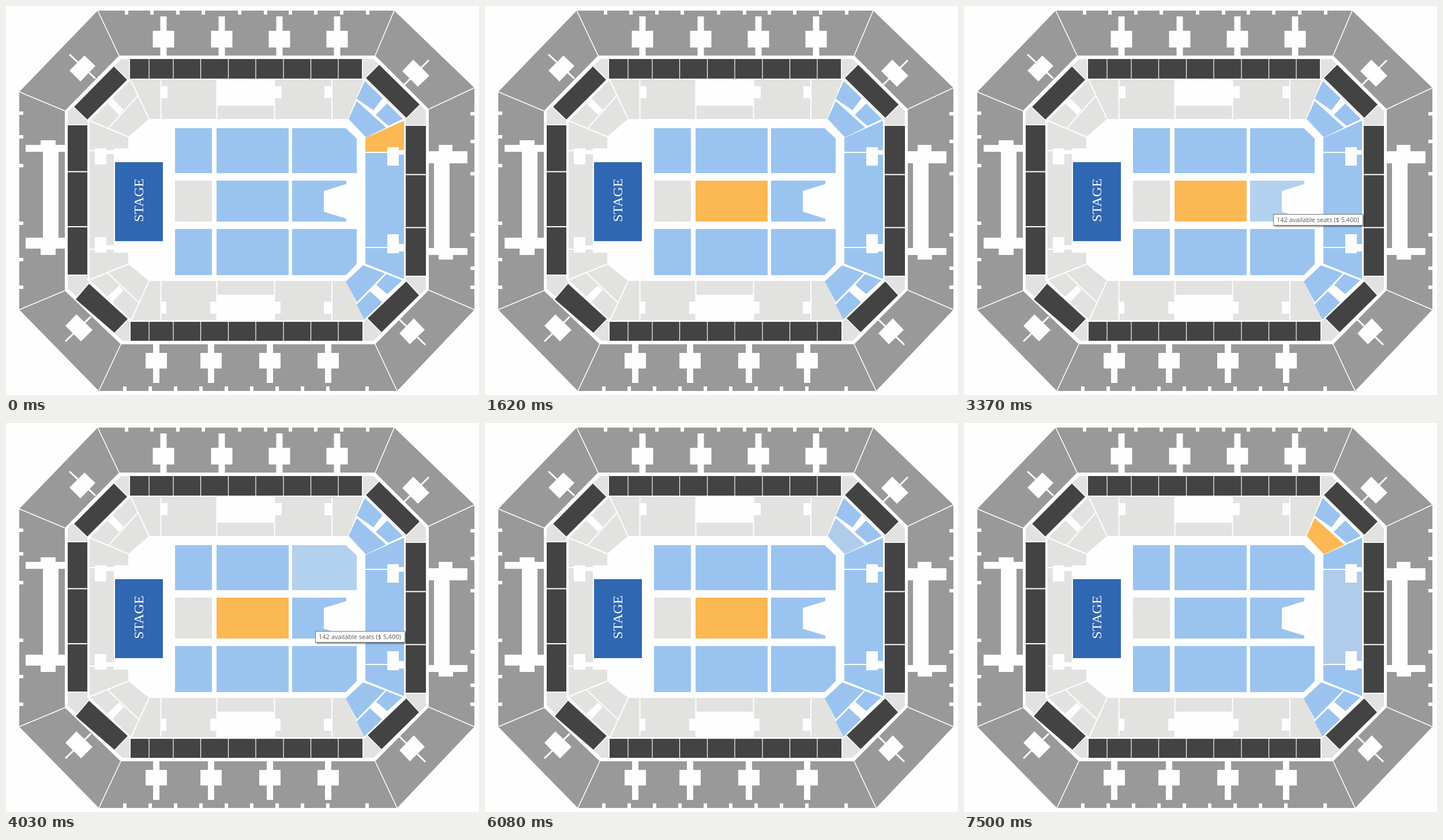
An HTML page that plays this animation: 820x675 px, repeating every 8000 ms.

```html
<!DOCTYPE html>
<html lang="en">
<head>
<meta charset="utf-8">
<title>Seating plan</title>
<style>
  html, body { margin: 0; width: 100%; height: 100%; overflow: hidden; background: #fefefe; }
  svg { display: block; width: 820px; height: 675px; }
  :root { --free: #9ac4ef; --floor: #b2d1ee; --stand: #b0cceb; --pick: #fcb852; }
  .outer { fill: #999; }
  .white { fill: #fefefe; }
  .light { fill: #e2e2e0; }
  .line { fill: none; stroke: #fefefe; stroke-width: 2; }
  .thin { stroke-width: 1.2; }
  .aisle { stroke-width: 3; }
  .dark { fill: #434343; stroke: #fefefe; stroke-width: 3; paint-order: stroke; }
  .seats { fill: var(--free); }
  .stage { font: 24px "Liberation Serif", "Times New Roman", serif; fill: #fff; }

  .seats, .tip { animation: 8s step-end infinite; }
  .tip { opacity: 0; font: 11px "Open Sans", "Noto Sans", sans-serif; }
  .tip rect { fill: #fff; stroke: #767676; filter: drop-shadow(2px 2px 1px rgba(0, 0, 0, .45)); }
  .tip text { fill: #575757; }

  #floor-c { animation-name: floor-c; }
  #floor-e { animation-name: floor-e; }
  #floor-ne { animation-name: floor-ne; }
  #floor-se { animation-name: floor-se; }
  #side-n { animation-name: side-n; }
  #side-e { animation-name: side-e; }
  #corner { animation-name: corner; }
  #tip-a { animation-name: tip-a; }
  #tip-b { animation-name: tip-b; }
  #tip-c { animation-name: tip-c; }

  @keyframes floor-c {
    0%, 80.25%, 100% { fill: var(--free); }
    8% { fill: var(--floor); }
    20.25% { fill: var(--pick); }
  }
  @keyframes floor-e {
    0%, 50.375%, 100% { fill: var(--free); }
    32.5% { fill: var(--floor); }
  }
  @keyframes floor-ne {
    0%, 66.5%, 100% { fill: var(--free); }
    50.375% { fill: var(--floor); }
  }
  @keyframes floor-se {
    0%, 8%, 100% { fill: var(--free); }
    5.25% { fill: var(--floor); }
  }
  @keyframes side-n {
    0% { fill: var(--pick); }
    20.25%, 70.625%, 100% { fill: var(--free); }
    66.5% { fill: var(--stand); }
  }
  @keyframes side-e {
    0% { fill: var(--free); }
    93.75%, 100% { fill: var(--stand); }
  }
  @keyframes corner {
    0% { fill: var(--free); }
    70.625% { fill: var(--stand); }
    80.25%, 100% { fill: var(--pick); }
  }
  @keyframes tip-a {
    0%, 53%, 100% { opacity: 0; }
    39.375% { opacity: .35; }
    40.75% { opacity: .7; }
    42.125% { opacity: 1; }
    51.625% { opacity: .5; }
  }
  @keyframes tip-b {
    0%, 76%, 100% { opacity: 0; }
    57.125% { opacity: 1; }
    73.375% { opacity: .66; }
    74.75% { opacity: .33; }
  }
  @keyframes tip-c {
    0%, 80.25%, 100% { opacity: 0; }
    77.5% { opacity: .4; }
    78.875% { opacity: .8; }
  }
</style>
</head>
<body>
<svg viewBox="0 0 820 675">
  <defs>
    <pattern id="hatch" width="6" height="6" patternUnits="userSpaceOnUse">
      <rect width="6" height="6" fill="#e4e4e2"/>
      <path d="M-1 7L7 -1M-1 1L1 -1M5 7L7 5" stroke="#d6d6d4"/>
    </pattern>
  </defs>

  <!-- Upper tier -->
  <path class="outer" d="M159 8H673L812 142V527L678 668H161L23 527V149Z"/>
  <path class="white" d="M196 86H640L733 179V493L640 587H199L102 494V182Z"/>
  <path class="line" style="stroke-width:1.6" d="M159 8L196 86M673 8L640 86M812 142L733 179M812 527L733 493M678 668L640 587M161 668L199 587M23 527L102 494M23 149L102 182"/>
  <g class="white" id="cuts">
    <path d="M60 233H86V241H102V253H91V402H102V421H86V432H60V421H34V402H64V253H34V241H60Z"/>
    <path d="M750 241H774V252H800V273H769V420H800V432H775V440H750V432H733V420H742V273H733V252H750Z"/>
    <path d="M136 86L155 104L129 131L110 112Z"/>
    <path d="M706 93L734 121L714 140L687 113Z"/>
    <path d="M122 535L150 562L130 582L103 555Z"/>
    <path d="M707 542L726 562L700 587L682 568Z"/>
  </g>
  <path class="line aisle" d="M110 84L155 126M733 94L690 137M103 582L147 539M682 544L727 588"/>

  <!-- Boxes -->
  <path class="light" d="M200 92H637L728 182V491L637 581H202L107 490V183Z"/>
  <path class="white" d="M212 126H621L693 197V476L621 547H213L141 476V198Z"/>
  <g class="dark">
    <path d="M215 92H617V126H215Z"/>
    <path d="M216 548H618V581H216Z"/>
    <path d="M107 207H141V466H107Z"/>
    <path d="M693 208H728V468H693Z"/>
    <path d="M187 105L210 128L141 197L118 175Z"/>
    <path d="M647 102L717 171L694 194L624 125Z"/>
    <path d="M144 482L211 543L188 567L121 509Z"/>
    <path d="M694 478L716 502L651 566L627 542Z"/>
  </g>
  <path class="line thin" id="splits"/>
  <path class="line thin" style="stroke-width:2" d="M107 287.5H141M107 383H141M693 292.5H728M693 384.5H728"/>

  <!-- Closed stands -->
  <path class="light" d="M216 128H620L593 196H248L212 227V247H187V428H212V448L248 477H589L621 545H217L145 475V200Z"/>
  <path class="line" d="M216 128L248 196M145 199L212 227M228 156L178 212M145 475L212 448M217 545L248 477M176 463L231 515M145 251H187M145 422H187M268.500 128V196M365.500 128V196M465.500 128V196M565 128V196M268.500 477V545M365.500 477V545M465.500 477V545M565 477V545"/>
  <g class="white">
    <path d="M184 160L204 180L196 189L175 168Z"/>
    <path d="M196 485L204 493L184 514L175 505Z"/>
    <path d="M365 128H466V139H478V160H466V173H365Z"/>
    <path d="M365 501H466V513H476V534H466V545H365V534H354V513H365Z"/>
    <path d="M268 139H280V160H268ZM552 139H564V160H552ZM268 513H278V534H268ZM551 513H564V534H551Z"/>
    <path d="M154 247H174V252H187V257H174V275H154Z"/>
    <path d="M154 401H174V415H187V421H174V428H154Z"/>
  </g>

  <!-- Open stands -->
  <path class="seats" d="M622 130L653 160L637 181L608 161Z"/>
  <path class="seats" d="M661 169L688 196L663 208L641 189Z"/>
  <path class="seats" id="corner" d="M608 165L659 211L624 228L594 196Z"/>
  <path class="seats" id="side-n" d="M690 199V253H623V229Z"/>
  <path class="seats" id="side-e" d="M623 255H690V418H623Z"/>
  <path class="seats" d="M623 420H690V474L623 447Z"/>
  <path class="seats" d="M619 450L657 464L608 514L589 478Z"/>
  <path class="seats" d="M659 465L687 476L661 500L642 484Z"/>
  <path class="seats" d="M631 495L652 514L621 544L608 518Z"/>
  <path class="white" d="M661 245H681V250H690V258H681V277H661Z"/>
  <path class="white" d="M661 396H681V413H690V426H681V429H661Z"/>

  <!-- Floor -->
  <path class="seats" d="M293 212H357V290H293Z"/>
  <path class="seats" d="M365 212H490V290H365Z"/>
  <path class="seats" id="floor-ne" d="M496 212H589L608 230V290H496Z"/>
  <path fill="url(#hatch)" d="M293 303H357V374H293Z"/>
  <path class="seats" id="floor-c" d="M365 303H490V374H365Z"/>
  <path class="seats" id="floor-e" d="M496 303H590V309L551 321V357L590 369V374H496Z"/>
  <path class="seats" d="M293 387H357V467H293Z"/>
  <path class="seats" d="M365 387H490V467H365Z"/>
  <path class="seats" id="floor-se" d="M496 387H608V448L589 467H496Z"/>
  <path fill="#3067b3" d="M189 271H272V408H189Z"/>
  <text class="stage" text-anchor="middle" transform="translate(238 337) rotate(-90)">STAGE</text>

  <g class="tip" id="tip-a" transform="translate(536 361)">
    <rect x=".5" y=".5" width="155" height="19"/>
    <text x="6" y="14">142 available seats ($ 5,400)</text>
  </g>
  <g class="tip" id="tip-b" transform="translate(524 267)">
    <rect x=".5" y=".5" width="149" height="19"/>
    <text x="6" y="14">47 available seats ($ 4,400)</text>
  </g>
  <g class="tip" id="tip-c" transform="translate(621 215)">
    <rect x=".5" y=".5" width="149" height="19"/>
    <text x="6" y="14">36 available seats ($ 4,400)</text>
  </g>
</svg>
<script>
  const box = (x, y, w, h) => `M${x} ${y}h${w}v${h}h${-w}Z`;

  // Stairs and edge notches cut into the upper tier
  const cuts = [
    ...[273, 374, 474, 574].map(x => box(x - 5.5, 18, 11, 69) + box(x - 18.5, 43, 37, 29)),
    ...[260.5, 355.5, 457.5, 558.5].map(x => box(x - 5.5, 586, 11, 68) + box(x - 18.5, 602, 37, 27)),
    ...[209, 253, 298, 342, 405, 450, 493, 537, 582, 627].map(x => box(x - 3, 7, 6, 8)),
    ...[206, 250, 294, 338, 382, 426, 470, 514, 558, 626].map(x => box(x - 3, 660, 6, 9)),
    ...[186, 227, 277, 377, 440, 488].map(y => box(22, y - 3, 8, 6)),
    ...[187, 235, 291, 397, 455, 488].map(y => box(805, y - 3, 8, 6))
  ];
  const path = document.createElementNS("http://www.w3.org/2000/svg", "path");
  path.setAttribute("d", cuts.join(""));
  // Separate subpaths overlap, all wound the same way
  document.getElementById("cuts").append(path);

  const splits = [248, 290, 337.5, 385.5, 433, 481, 528.5, 576];
  document.getElementById("splits").setAttribute("d",
    splits.map(x => `M${x} 92V126M${x} 548V581`).join(""));
</script>
</body>
</html>
```
